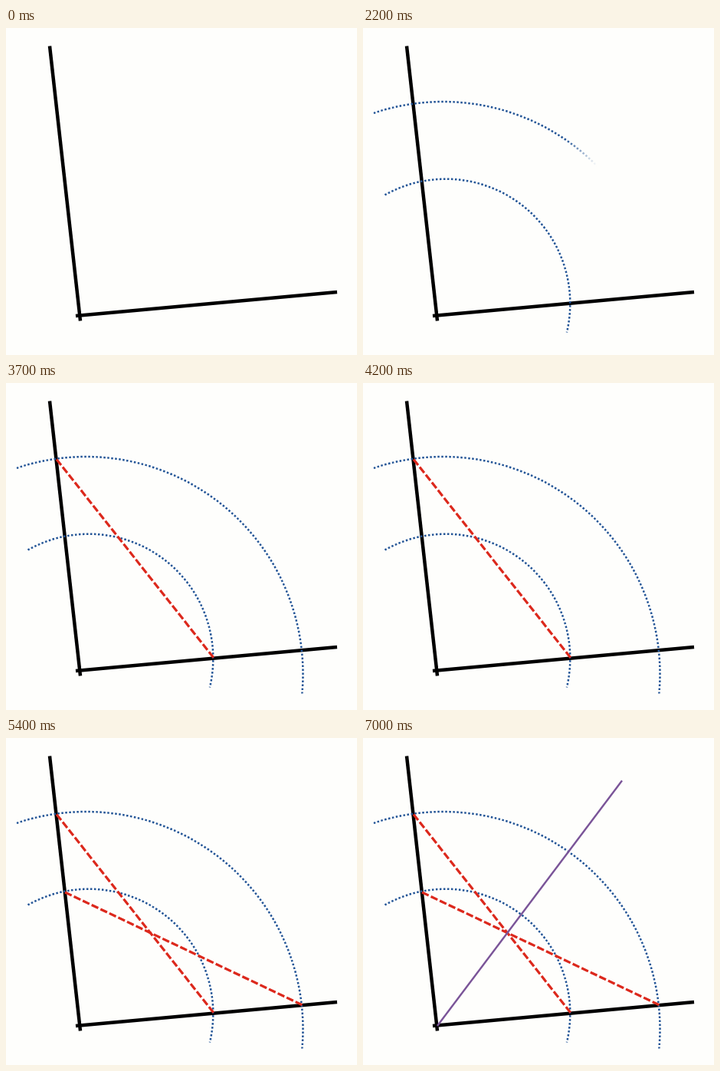
An HTML page with a canvas that plays this animation: 458 by 426 pixels, repeating every 7600 ms.

```html
<!DOCTYPE html>
<html>
<head>
<meta charset="utf-8">
<style>
html, body { margin: 0; height: 100%; overflow: hidden; background: #fefefc; }
canvas { display: block; }
</style>
</head>
<body>
<canvas id="stage" width="458" height="426"></canvas>
<script>
const ctx = document.getElementById('stage').getContext('2d');
const LOOP = 7600, STEP = 100, WIPE = 500, SOFT = 0.11;

const line = (x1, y1, x2, y2) => {
  const p = new Path2D();
  p.moveTo(x1, y1);
  p.lineTo(x2, y2);
  return p;
};

// Circular arc running clockwise between two points on the circle
const arc = (cx, cy, r, x1, y1, x2, y2) => {
  const p = new Path2D();
  p.arc(cx, cy, r, Math.atan2(y1 - cy, x1 - cx), Math.atan2(y2 - cy, x2 - cx));
  return p;
};

const BLACK = { rgb: '0,0,0', width: 4.5, dash: [] };
const DOTS = { rgb: '34,84,150', width: 2.5, dash: [2.5, 2.5] };
const DASHES = { rgb: '220,40,28', width: 3.2, dash: [9.6, 3.2] };
const THIN = { rgb: '122,84,152', width: 2.4, dash: [] };

const arms = [line(57, 23.5, 97, 381.5), line(91, 375, 432, 344)];

// Each wipe runs along one axis from "from" to "to"
const wipes = [
  { start: 550, style: DOTS, axis: 'x', from: 28, to: 272, path: arc(108, 359, 162.3, 28.5, 217.5, 266, 396.5) },
  { start: 1850, style: DOTS, axis: 'x', from: 14, to: 389, path: arc(104.5, 379, 283, 14, 111, 386.5, 404.5) },
  { start: 3100, style: DASHES, axis: 'x', from: 66, to: 271, path: line(66, 99.5, 271, 358) },
  { start: 4350, style: DASHES, axis: 'x', from: 387, to: 77, path: line(77, 201, 387, 348) },
  { start: 5600, style: THIN, axis: 'y', from: 375, to: 55, path: line(97, 375, 338, 55.5) }
];

function stroke(path, style, paint) {
  ctx.strokeStyle = paint;
  ctx.lineWidth = style.width;
  ctx.setLineDash(style.dash);
  ctx.stroke(path);
}

// Soft-edged paint: opaque behind the moving front, clear ahead of it
function wipePaint({ style, axis, from, to }, p) {
  const solid = `rgb(${style.rgb})`;
  if (p >= 1) return solid;
  const front = p * (1 + SOFT);
  const at = k => from + (to - from) * k;
  const a = at(front - SOFT), b = at(front);
  const g = axis === 'x'
    ? ctx.createLinearGradient(a, 0, b, 0)
    : ctx.createLinearGradient(0, a, 0, b);
  g.addColorStop(0, solid);
  g.addColorStop(1, `rgba(${style.rgb},0)`);
  return g;
}

function draw(t) {
  ctx.fillStyle = '#fefefc';
  ctx.fillRect(0, 0, 458, 426);
  for (const arm of arms) stroke(arm, BLACK, `rgb(${BLACK.rgb})`);
  for (const w of wipes) {
    const p = (t - w.start) / WIPE;
    if (p > 0) stroke(w.path, w.style, wipePaint(w, p));
  }
}

const begin = performance.now();
function tick() {
  const t = (performance.now() - begin) % LOOP;
  draw(Math.floor(t / STEP) * STEP);
  requestAnimationFrame(tick);
}
tick();
</script>
</body>
</html>
```
